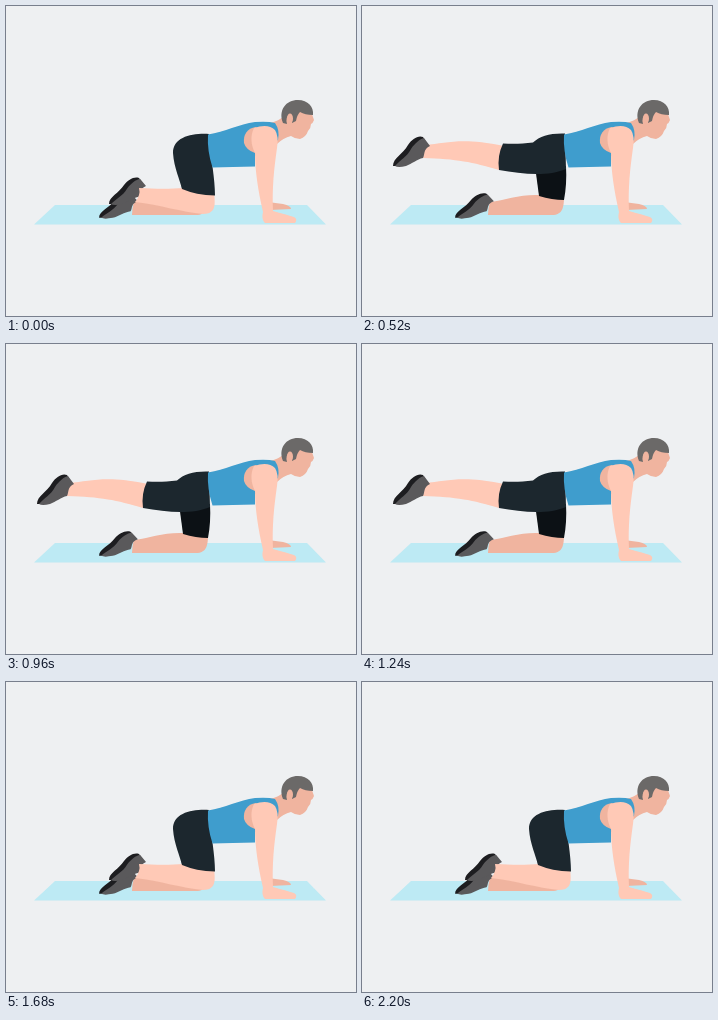
Animation of 350x310 px, one loop 2280 ms. Source, as an HTML page:

```html
<!DOCTYPE html>
<html lang="en">
<head>
<meta charset="utf-8">
<title>Kneeling leg raise</title>
<style>
  html, body { margin: 0; width: 100%; height: 100%; overflow: hidden; background: #eef0f2; }
  svg { display: block; }
  .skin { fill: #ffc9b6; }
  .shade { fill: #f0b49f; }
  .shirt { fill: #3f9dcd; }
  .shorts { fill: #1c272e; }
</style>
</head>
<body>
<svg width="350" height="310" viewBox="0 0 350 310">
  <defs>
    <g id="shoe">
      <path fill="#1d1d20" d="M31 160C31 152 41 148 46 139C50 133 56 129 61 131L64 136L40 160Z"/>
      <path fill="#5a595b" d="M33 160C38 154 45 151 49 143C53 137 58 133 62 132L68 140C61 143 63 149 61 152C55 153 50 158 44 160Q36 162 33 160Z"/>
    </g>
  </defs>

  <path fill="#bdeaf4" d="M49 199H301L320 218.500H28Z"/>

  <!-- far arm -->
  <path class="shade" d="M262 196L277 198Q285 200 285 203L264 204Z"/>

  <!-- far leg -->
  <path class="shade" d="M128 196C144 194 158 188 178 189L202 190C202 201 201 209 190 209H126Q126 202 128 196Z"/>
  <path fill="#0c1115" d="M173 160H204Q205 178 202 194Q190 194 177 190Z"/>
  <use href="#shoe" transform="translate(60.500 79) scale(1.05 .83)"/>

  <!-- near leg, knee on the mat -->
  <g id="down">
    <use href="#shoe" transform="translate(72 54) scale(1 .9)"/>
    <path class="skin" d="M133 182C150 183 165 183 178 182L208 186C209 197 211 208 197 208C175 206 155 199 129 196Q135 189 133 182Z"/>
    <path class="shorts" d="M203 128C186 127 167 131 167 147C168 162 174 174 176 183Q190 189 209 189.500C209 172 205 155 203 128Z"/>
  </g>

  <!-- near leg, stretched back -->
  <g id="up">
    <path class="skin" d="M63 139C85 137 100 131 142 140L140 164H137C110 156 95 153 61 152Z"/>
    <use href="#shoe"/>
    <path class="shorts" d="M203 127.500C188 127 178 130 171 136.500C160 138 150 138 141 137.500Q135 150 137 164C160 168 185 171 204 163Z"/>
  </g>

  <!-- head and neck -->
  <path class="shade" d="M264 117Q273 115 278 110L288 101L305 103Q306 109 308 114Q307 117 305 118Q305 122 302 125Q300 131 294 133Q289 133 285 130Q277 132 271 138Z"/>
  <path fill="#6b6968" d="M277 117C272 104 280 94 292 94C302 94 308 101 307 109Q299 109 294 106Q291 109 290 115L286 117Q287 110 284 108Q279 111 281 118Z"/>
  <ellipse class="shade" cx="284" cy="112.500" rx="3" ry="5"/>

  <!-- torso -->
  <path class="shirt" d="M202 128.500C219 126 233 118 249 116Q262 115 269 117Q274 124 272 134L249 150V160.500Q226 161 206.500 161.500Q201 145 202 128.500Z"/>

  <!-- near arm -->
  <path class="shade" d="M250 121C241 122 237 129 238 137Q240 144 249 147L258 128Z"/>
  <path class="skin" d="M248 122Q262 117 269 124Q273 130 271 142C268 163 266 182 267 205Q282 209 288 211Q292 213 289 217H259Q255 213 257 206C252 184 249 164 249 147C245 139 244 130 248 122Z"/>
</svg>

<script>
const LOOP = 2280, RAISE = 320, LOWER = 1380;
const down = document.getElementById("down"), up = document.getElementById("up");

// The near leg cuts between its two poses
function draw(now) {
  const t = now % LOOP, raised = t >= RAISE && t < LOWER;
  up.style.display = raised ? "" : "none";
  down.style.display = raised ? "none" : "";
}

const start = performance.now();
function tick() {
  draw(performance.now() - start);
  requestAnimationFrame(tick);
}
tick();
</script>
</body>
</html>
```
